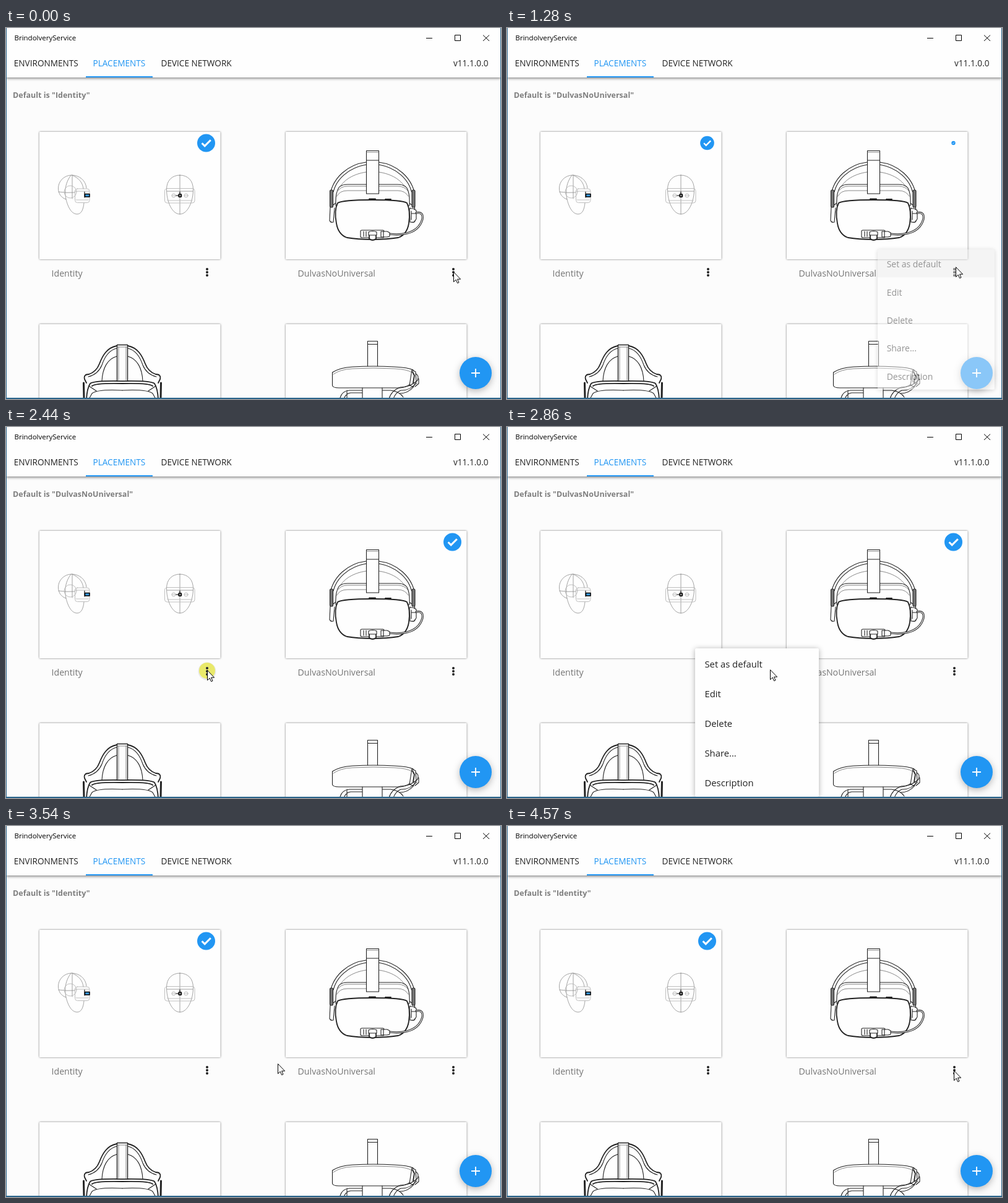
These frames come from a looping animation (800x600 px, 4.64 s). An HTML page:

```html
<!DOCTYPE html>
<html lang="en">
<head>
<meta charset="utf-8">
<title>Placements</title>
<style>
  html, body { margin: 0; width: 100%; height: 100%; overflow: hidden; background: #fcfcfc; }
  svg { display: block; width: 800px; height: 600px; }
  text { font-family: "Open Sans", "Noto Sans", sans-serif; fill: #222; }
  .title { font-size: 11.5px; fill: #000; }
  .tab { font-size: 13.6px; }
  .on { fill: #2196f3; }
  .head { font-size: 12.5px; font-weight: 700; fill: #7f7f7f; }
  .label { font-size: 14.2px; fill: #757575; }
  .item { font-size: 14.8px; }
  .card { fill: #fefefe; filter: drop-shadow(0 0 1.4px rgba(0, 0, 0, .55)); }
  .bar { fill: #fefefe; filter: drop-shadow(0 1px 2.5px rgba(0, 0, 0, .6)); }
  .fab { fill: #2196f3; filter: drop-shadow(0 3px 6px rgba(0, 0, 0, .28)); }
  .sheet { fill: #fefefe; filter: drop-shadow(0 1px 4px rgba(0, 0, 0, .32)); }
  .art { fill: none; stroke: #222; stroke-width: 1.1; stroke-linejoin: round; stroke-linecap: round; }
  .soft { stroke: #8c8c8c; stroke-width: .8; }
  .pale { stroke: #b8b8b8; stroke-width: .9; }
  .bold { stroke-width: 1.8; }
  .thin { stroke-width: .7; stroke: #555; }
  .solid { fill: #fefefe; }
  #glow { fill: #f5f06a; mix-blend-mode: darken; }
</style>
</head>
<body>
<svg viewBox="0 0 800 600">
  <defs>
    <g id="dots" fill="#222"><circle cy="-5" r="2"/><circle r="2"/><circle cy="5" r="2"/></g>
    <g id="tick">
      <circle r="14.5" fill="#2196f3"/>
      <path d="M-6.900 .3L-2.300 4.900L7.300 -4.700" fill="none" stroke="#fff" stroke-width="3"/>
    </g>
    <!-- left halves, mirrored where the drawing is symmetric -->
    <g id="goHalf">
      <path d="M582 217C550 221 530 244 525 264M582 221C553 226 534 245 529 265"/>
      <path class="thin" d="M582 233C561 236 546 246 540 257"/>
      <rect x="523.5" y="262" width="5" height="28" rx="2" fill="#777"/>
      <path d="M524 290L523 311Q524 315 529 314L531 291M529 286L533 283"/>
    </g>
    <g id="archHalf">
      <path class="bold" d="M179 514C163 517 156 530 151 543Q146 556 134 560Q125 560 127 568L130 574"/>
      <path d="M179 518C166 521 159 533 155 545Q149 560 133 564"/>
      <path d="M179 531C164 535 156 550 155 571"/>
      <path class="bold" d="M188 571Q142 570 136 575Q131 583 130 600M188 575Q144 574 139 579"/>
      <path d="M188 586Q148 584 139 591L134 600M134 579L146 587"/>
      <path d="M125.500 574L126 599" stroke-width="3"/>
    </g>
  </defs>

  <rect width="800" height="600" fill="#fcfcfc"/>
  <rect class="bar" width="800" height="80"/>
  <text class="title" x="13.500" y="20">BrindolveryService</text>
  <path d="M679 16.500H689M725.500 11.500H734.500V20.500H725.500ZM771 11.500L781 21M781 11.500L771 21" fill="none" stroke="#000"/>
  <text class="tab" x="12.800" y="62">ENVIRONMENTS</text>
  <text class="tab on" x="140.500" y="62">PLACEMENTS</text>
  <text class="tab" x="250.500" y="62">DEVICE NETWORK</text>
  <text class="tab" x="723" y="62">v11.1.0.0</text>
  <rect x="129" y="78" width="108" height="2" fill="#2196f3"/>
  <text class="head" id="head" x="11" y="113"></text>

  <rect class="card" x="54" y="168" width="292.500" height="206" rx="1"/>
  <rect class="card" x="452" y="168" width="292.500" height="206" rx="1"/>
  <rect class="card" x="54" y="479" width="292.500" height="206" rx="1"/>
  <rect class="card" x="452" y="479" width="292.500" height="206" rx="1"/>

  <!-- heads -->
  <g class="art">
    <path class="soft" d="M130 259C129 246 118 238 106 238C94 238 84 248 84.500 260C85 270 91 275 97 277C99 285 104 301 115 301C122 301 125 293 126 283"/>
    <path class="soft" d="M107 238V276M105 238C96 250 94 263 97 277M85 265Q98 267 111 266M107 238C118 243 124 250 125 260"/>
    <circle class="pale" cx="104" cy="265" r="10"/>
    <rect class="pale" x="111.500" y="260" width="23.500" height="22.500" rx="4"/>
    <path class="pale" d="M111 264H134M113 278H133"/>
    <rect x="127.500" y="268.500" width="7.500" height="4.500" fill="#3a9be0" stroke="#000" stroke-width="1.500"/>
    <path d="M127 265V274" stroke="#000"/>
    <path class="soft" d="M281 238C294 238 302.500 247 302.500 261C302.500 280 294 301 281 301C268 301 259.500 280 259.500 261C259.500 247 268 238 281 238ZM281 238V301M260 264H302"/>
    <rect class="pale" x="256.500" y="259.500" width="48.500" height="23.500" rx="4"/>
    <path class="pale" d="M261 279H301M268 271H274M288 271H294"/>
    <circle class="pale" cx="271" cy="271" r="3"/><circle class="pale" cx="291" cy="271" r="3"/>
    <path d="M275 271H281M281 265V268" stroke="#000"/>
    <rect x="279" y="268.800" width="4.500" height="4.500" rx="1" fill="#888" stroke="#000" stroke-width="1.500"/>
  </g>

  <!-- headset with cable -->
  <g class="art">
    <use href="#goHalf"/>
    <use href="#goHalf" transform="matrix(-1 0 0 1 1184.500 0)"/>
    <path class="solid" d="M533 287Q532 267 538 258Q542 253 552 253H633Q644 253 648 259Q653 268 652 287Z"/>
    <path class="thin" d="M537 263Q541 256 552 256H633Q644 256 649 263M535 272Q539 263 552 263H633Q645 263 650 272"/>
    <path class="solid" d="M582.500 198.500H602.500V268H582.500Z"/>
    <path d="M582.500 214H602.500"/><path class="thin" d="M582.500 201H602.500"/>
    <path class="bold solid" d="M536 283Q544 278 592 278Q641 278 648 283Q654 295 651 316Q648 334 634 339Q616 342 592 342Q568 342 551 339Q537 334 534 316Q530 295 536 283Z"/>
    <path d="M587 276.500H597M613 277H622" stroke-width="2"/>
    <path class="solid" d="M652 292H658L663 295V309L659 314H653Z"/>
    <path d="M655 296V310M655 300H663"/>
    <path d="M663 299Q675 297 673 309Q668 327 648 332Q635 335 619 333" stroke-width="3.200"/>
    <path d="M663 299Q675 297 673 309Q668 327 648 332Q635 335 619 333" stroke="#fefefe"/>
    <rect class="solid" x="573" y="327" width="38" height="12" rx="2"/>
    <path class="solid" d="M606 329H616L620 331V337L616 338H606Z"/>
    <path d="M578 329V337M582 329V337M610 329V338"/>
    <path class="solid bold" d="M587 331H598V341Q592.500 345 587 341Z"/>
    <path class="solid" d="M586 330Q592.500 327 599 330V335H586Z"/>
  </g>

  <!-- lower left headset -->
  <g class="art">
    <use href="#archHalf"/>
    <use href="#archHalf" transform="matrix(-1 0 0 1 376 0)"/>
    <path class="solid" d="M179.500 512.500H196.500V571H179.500Z" stroke-width="1.400"/>
    <path d="M179.500 516H196.500M182 516V571M194 516V571" class="thin"/>
  </g>

  <!-- lower right headset -->
  <g class="art">
    <path class="solid" d="M584.500 506.500H600.500V549H584.500Z"/><path d="M584.500 511.500H600.500"/>
    <path class="solid" d="M527.500 557Q540 549 560 548Q594 546 628 548Q650 549 658 553L661 558L659 570Q652 580 638 582H538Q528 582 527.500 578Z"/>
    <path class="thin" d="M529 560Q540 552 560 551Q594 549 628 551Q648 552 656 557"/>
    <path d="M576 582V600M608 582V600M540 598Q543 587 555 586H576M546 600Q549 591 557 590H576M608 586H622Q636 588 642 597M551 586V600"/>
    <path class="solid" d="M656 553L662 556L663 572L658 580L652 578Z"/>
    <path class="bold" d="M657 556L660 562L658 574"/>
    <path d="M662 559Q668 562 665 570Q653 581 637 581Q622 587 619 600M664 574Q652 587 638 586Q629 590 626 600M659 580Q650 591 636 591M667 567V575L661 580"/>
  </g>

  <g id="ripple"><circle r="14.500" fill="#e9e9e9"/></g>
  <use href="#dots" x="325" y="395"/>
  <use href="#dots" x="723" y="395"/>
  <text class="label" x="73.500" y="402">Identity</text>
  <text class="label" x="471.500" y="402">DulvasNoUniversal</text>
  <use href="#tick" id="tickA"/>
  <use href="#tick" id="tickB"/>

  <circle class="fab" cx="759" cy="558" r="26"/>
  <path d="M752 558H766M759 551V565" stroke="#fff" stroke-width="1.800"/>

  <g id="menu">
    <rect class="sheet" width="200" height="240" rx="2"/>
    <rect id="row" width="200" height="48" fill="#000" opacity=".07"/>
  </g>

  <path d="M.5 0V600M799.500 0V600" fill="none" stroke="#2a658c"/>
  <path d="M0 599H800" stroke="#2a658c" stroke-width="2"/>
  <circle id="glow" r="13"/>
  <path id="cursor" d="M.5 .7V16.600L4.200 13.100L6.600 18.600L9 17.600L6.600 12.200H11.600Z" fill="#fff" stroke="#000"/>
</svg>
<script>
  const $ = id => document.getElementById(id);
  const LOOP = 4640, STEP = 70;
  const bursts = [0, 400, 810, 1210, 1770, 2440, 3000, 3400, 3960, 4570];
  const clicks = [400, 1210, 2440, 3400];
  const menus = [
    { x: 599, open: 405, press: 1210, close: 1247 },
    { x: 304, open: 2445, press: 3400, close: 3398 }
  ];
  // time, x, y of the pointer tip
  const path = [
    [0, 723, 394], [740, 723, 394], [810, 723, 391], [950, 725, 386], [1280, 725, 386],
    [1350, 705, 388], [1630, 455, 393], [1700, 412, 393], [1770, 385, 393], [1910, 345, 393],
    [2180, 325, 393], [2580, 325, 393], [2650, 337, 394], [2790, 400, 394], [2860, 425, 392],
    [2930, 433, 388], [3140, 439, 384], [3540, 439, 384], [3610, 454, 386], [3820, 612, 397],
    [3890, 644, 399], [3960, 670, 400], [4100, 705, 399], [4380, 721, 396], [4450, 722, 396],
    [4570, 722, 395], [LOOP, 722, 395]
  ];

  const clamp = v => Math.min(1, Math.max(0, v));
  const easeOut = (v, n) => 1 - (1 - clamp(v)) ** n;
  const place = (id, x, y, s = 1) => $(id).setAttribute("transform", `translate(${x} ${y}) scale(${s})`);
  const show = (id, on) => $(id).style.display = on ? "" : "none";

  ["Set as default", "Edit", "Delete", "Share...", "Description"].forEach((label, i) => {
    const el = document.createElementNS("http://www.w3.org/2000/svg", "text");
    el.setAttribute("class", "item");
    el.setAttribute("x", 15.5);
    el.setAttribute("y", 31 + 48 * i);
    el.textContent = label;
    $("menu").append(el);
  });

  // The screen refreshes in short bursts and rests in between.
  function snap(t) {
    const start = bursts.filter(b => b <= t).pop();
    return start + Math.floor((t - start) / STEP) * STEP;
  }

  function pointer(t) {
    const i = Math.max(1, path.findIndex(p => p[0] > t));
    const [a, b] = [path[i - 1], path[i]];
    const k = (t - a[0]) / (b[0] - a[0]);
    return [1, 2].map(n => Math.round(a[n] + (b[n] - a[n]) * k));
  }

  function drawMenu(t) {
    const m = menus[t < 2000 ? 0 : 1];
    const shown = (n, ms) => easeOut((t - m.open) / ms, n) - easeOut((t - m.close) / ms, n);
    const alpha = shown(3, 150);
    show("menu", alpha > .005);
    $("menu").setAttribute("opacity", alpha);
    place("menu", m.x, 358, .9 + .1 * shown(5, 220));
    show("row", t >= m.press);
  }

  function draw(t) {
    const [x, y] = pointer(t);
    const click = clicks.findIndex(c => t >= c && t < c + STEP);
    place("cursor", x, y);
    place("glow", x, y + 1);
    show("glow", click >= 0);
    place("ripple", click ? 325 : 723, 395);
    show("ripple", click === 0 || click === 2);

    const [first, second] = menus;
    const k = clamp((t - first.close) / 150) - clamp((t - second.close) / 140);
    place("tickA", 323.5, 186, 1 - k);
    place("tickB", 721.5, 186, k);
    show("tickA", k < 1);
    show("tickB", k > 0);
    const name = t >= first.close && t < second.close ? "DulvasNoUniversal" : "Identity";
    $("head").textContent = `Default is "${name}"`;
    drawMenu(t);
  }

  const begin = performance.now();
  function tick() {
    draw(snap((performance.now() - begin) % LOOP));
    requestAnimationFrame(tick);
  }
  tick();
</script>
</body>
</html>
```
